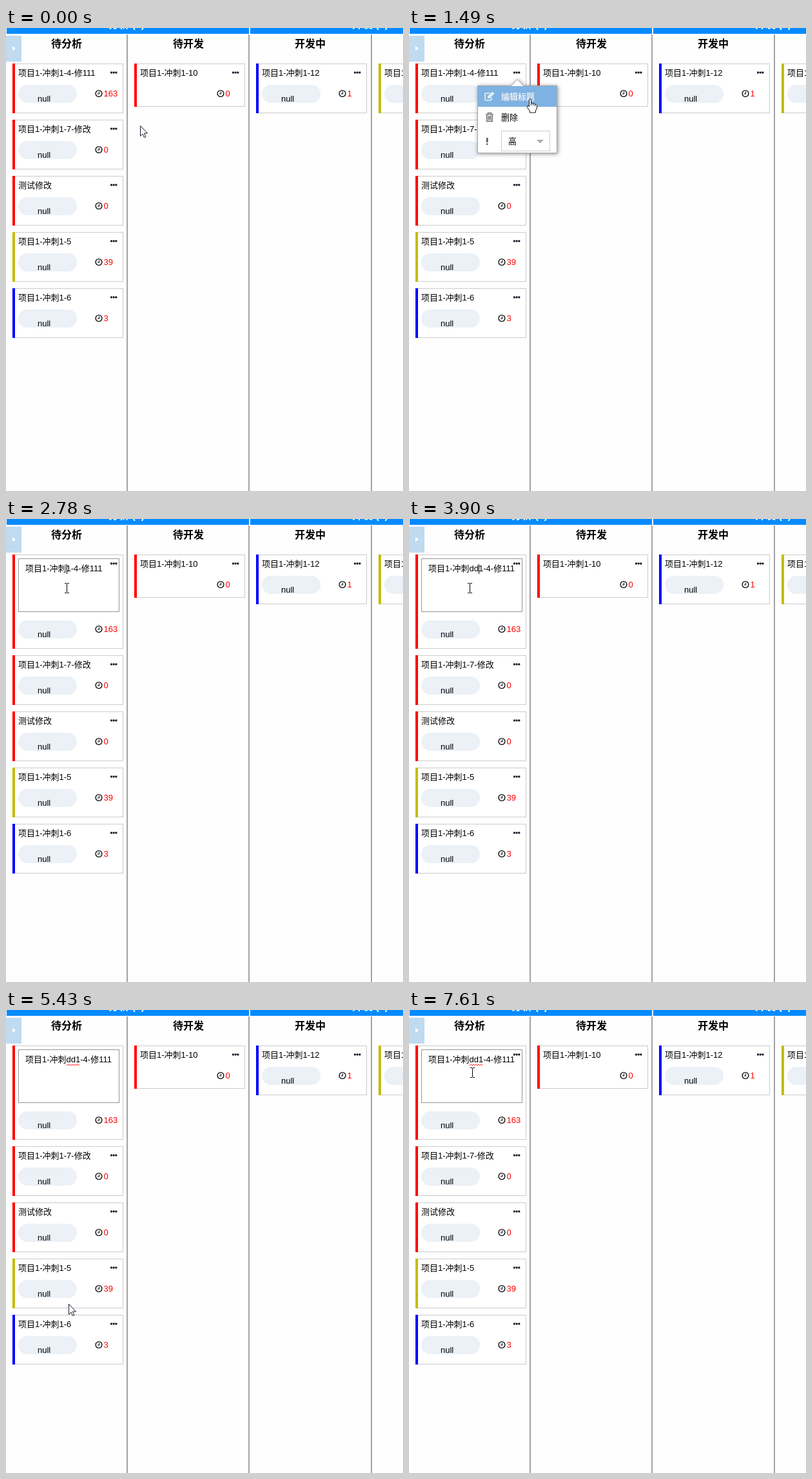
Write an HTML page that moves like this. It is 616 px wide and 717 px high and loops after 8000 ms.

```html
<!DOCTYPE html>
<html lang="zh-CN">
<head>
<meta charset="utf-8">
<title>Board</title>
<style>
html, body { margin: 0; width: 100%; height: 100%; overflow: hidden; background: #fefefe; }
svg { display: block; font: 13px "Liberation Sans", "Noto Sans CJK SC", "Noto Sans CJK", sans-serif; }
.head { font-size: 16px; font-weight: bold; text-anchor: middle; }
.popup { filter: drop-shadow(1px 1px 3px rgba(0, 0, 0, .45)); }
</style>
</head>
<body>
<svg id="stage" width="616" height="717" viewBox="0 0 616 717"></svg>
<script>
const LOOP = 8000;
const RED = '#f00', YELLOW = '#c4bc0c', BLUE = '#00f';

const rect = (x, y, w, h, fill, extra = '') =>
  `<rect x="${x}" y="${y}" width="${w}" height="${h}" fill="${fill}" ${extra}/>`;
const frame = (x, y, w, h, stroke, extra = '') =>
  rect(x + .5, y + .5, w - 1, h - 1, '#fff', `stroke="${stroke}" ${extra}`);
const text = (x, y, str, extra = '') => `<text x="${x}" y="${y}" ${extra}>${str}</text>`;
const line = (d, stroke, extra = '') => `<path d="${d}" fill="none" stroke="${stroke}" ${extra}/>`;
const group = (id, body, extra = '') => `<g id="${id}" ${extra}>${body}</g>`;

const dots = (x, y) =>
  [0, 3.7, 7.4].map(dx => rect(x + dx, y, 2.9, 3, '#0c1626', 'rx=".8"')).join('');

const clock = (x, y) =>
  `<circle cx="${x}" cy="${y}" r="4.9" fill="none" stroke="#111" stroke-width="1.4"/>` +
  line(`M${x + .5} ${y - 3}V${y + .5}H${x - 2.2}`, '#111', 'stroke-width="1.1"');

const details = (x, y, count, pill) =>
  (pill ? rect(x + 9, y + 33, 91, 28, '#ebf1f6', 'rx="14"') + text(x + 39, y + 59, 'null') : '') +
  clock(x + 134, y + 46.5) + text(x + 141.5, y + 51, count, `fill="${RED}"`);

const box = (x, y, h, color) => frame(x, y, 172, h, '#ccc') + rect(x, y, 4, h, color);

const card = (x, y, color, title, count, pill = true) =>
  box(x, y, pill ? 77 : 67, color) + text(x + 9, y + 19, title) +
  dots(x + 152, y + 12.5) + details(x, y, count, pill);

const board =
  rect(1, 0, 615, 9, '#058bff') + rect(377, 0, 2, 9, '#fff') +
  text(187, 0, '分析 (5)', 'class="head" fill="#fff"') +
  text(565, 0, '开发 (2)', 'class="head" fill="#fff"') +
  [187, 376, 566].map(x => rect(x, 10, 2, 707, '#a3a3a3')).join('') +
  ['待分析', '待开发', '开发中'].map((s, i) => text(94 + i * 189, 30, s, 'class="head"')).join('') +
  card(199, 55, RED, '项目1-冲刺1-10', 0, false) +
  card(388, 55, BLUE, '项目1-冲刺1-12', 1) +
  card(578, 55, YELLOW, '项目1-冲刺1-11', 2);

const lowerCards = [
  [RED, '项目1-冲刺1-7-修改', 0],
  [RED, '测试修改', 0],
  [YELLOW, '项目1-冲刺1-5', 39],
  [BLUE, '项目1-冲刺1-6', 3]
].map((c, i) => card(10, 142 + i * 87, ...c)).join('');

let wave = 'M94 86';
for (let x = 96, up = true; x <= 115; x += 2, up = !up) wave += `L${x} ${up ? 84 : 86}`;

const editor =
  box(10, 55, 146, RED) + details(10, 124, 163, true) +
  frame(19, 61, 157, 83, '#999', 'id="field"') +
  text(30, 81, '', 'id="value"') +
  line(wave, '#f22', 'id="squiggle"') +
  group('editorDots', dots(162, 67.5)) +
  rect(0, 70, 1, 15, '#000', 'id="caret"');

const pencil = line('M128 107.5V110.5Q128 112 126.500 112H119.500Q118 112 118 110.500V102.500' +
  'Q118 101 119.500 101H126', 'currentColor', 'stroke-width="1.7"') +
  '<path d="M122 106L129.500 98.500L132.500 101.500L125 109H122Z" fill="currentColor"/>';

const trash = line('M119 134H131M122.500 133.500V131.700H127.500V133.500M120.700 134V144.300H129.300V134' +
  'M123 136V142.500M125 136V142.500M127 136V142.500', '#555', 'stroke-width="1.2"');

const menu =
  group('', frame(106, 89, 124, 105, '#a6a6a6') +
    '<path d="M158 90L168 79.500L178 90" fill="#fff" stroke="#a6a6a6"/>', 'class="popup"') +
  rect(107, 90, 122, 32, '#7eb2e2', 'id="hilite"') +
  group('firstRow', pencil + text(143, 110.5, '编辑标题', 'fill="currentColor"')) +
  trash + text(143, 143, '删除') +
  rect(120, 170, 2.6, 7, '#555', 'rx=".8"') + rect(120, 178.500, 2.6, 2.6, '#555', 'rx=".8"') +
  frame(143, 159, 76, 32, '#ccc') + text(154, 180, '高') +
  '<path d="M198 173H209L203.500 178.500Z" fill="#aaa"/>';

const cursors =
  group('arrow', '<path d="M.5 .5V16.500L4 13L6.500 18.500L9 17.500L6.500 12H11.500Z" fill="#fff" stroke="#1a1a30"/>') +
  group('hand', '<path d="M-1.500 1.500Q0-.5 1.500 1.500V7.500Q3 6.500 4.500 8Q6.500 7.300 7.500 9Q9.500 8.500 10.500 10.500' +
    'V15L8.500 19V22H-.5V20L-4.800 13.500Q-5 11-3 11.500L-1.500 13Z" fill="#fff" stroke="#111"/>' +
    line('M1.500 7.500V11M4.500 8V11M7.500 9V12', '#111')) +
  group('beam', line('M-3-7.500H0M1-7.500H4M.5-7V7M-3 7.500H0M1 7.500H4', '#000'));

const stage = document.getElementById('stage');
stage.innerHTML = board +
  group('idle', card(10, 55, RED, '项目1-冲刺1-4-修111', 163)) +
  group('lower', lowerCards) + group('editing', editor) +
  rect(0, 12, 24, 40, '#c0daf0') + '<path d="M10 28L15 31.500L10 35Z" fill="#fff"/>' +
  group('menu', menu) + cursors;

const el = {};
stage.querySelectorAll('[id]').forEach(n => { if (n.id) el[n.id] = n; });

// [start ms, kind, x, y]
const pointer = [
  [0, 'arrow', 208, 151], [120, 'arrow', 206, 146], [255, 'arrow', 194, 116],
  [390, 'arrow', 177, 85], [525, 'hand', 168, 70], [660, 'hand', 166, 66],
  [1360, 'hand', 180, 94], [1490, 'hand', 188, 109], [1960, 'arrow', 188, 109],
  [2390, 'beam', 162, 108], [2520, 'beam', 118, 107], [2650, 'beam', 94, 107],
  [4020, 'beam', 94, 116], [4165, 'arrow', 92, 215], [4310, 'arrow', 87, 390],
  [4450, 'arrow', 81, 525], [4590, 'arrow', 78, 590], [4730, 'arrow', 78, 607],
  [4880, 'arrow', 78, 610], [5010, 'arrow', 78, 612], [5280, 'arrow', 82, 580],
  [5420, 'arrow', 97, 455], [5560, 'arrow', 118, 300], [5700, 'beam', 135, 175],
  [5840, 'beam', 143, 138], [5980, 'beam', 144, 134], [6370, 'beam', 158, 139],
  [6510, 'arrow', 207, 158], [6650, 'arrow', 250, 176], [6790, 'arrow', 263, 181],
  [7070, 'arrow', 224, 158], [7200, 'beam', 130, 110], [7330, 'beam', 98, 97]
];
// [start ms, x]; x = 0 hides the caret
const caret = [
  [0, 0], [2780, 94], [3340, 0], [3740, 101], [3880, 108], [4450, 0], [5010, 108],
  [5420, 0], [5980, 144], [6510, 0], [7070, 144], [7610, 0]
];
const typed = [[0, ''], [3740, 'd'], [3880, 'dd']];

const at = (steps, t) => steps.findLast(s => s[0] <= t);
const show = (name, on) => { el[name].style.display = on ? '' : 'none'; };

function draw(t) {
  const [, kind, x, y] = at(pointer, t);
  const caretX = at(caret, t)[1];
  const editing = t >= 1960;
  const lit = t >= 1360;

  show('idle', !editing);
  show('editing', editing);
  el.lower.setAttribute('transform', `translate(0 ${editing ? 69 : 0})`);

  show('menu', t >= 930 && !editing);
  show('hilite', lit);
  el.firstRow.setAttribute('color', lit ? '#e9eef2' : '#333');
  el.firstRow.setAttribute('font-weight', lit ? 'bold' : 'normal');

  el.field.setAttribute('stroke', t < 2780 ? '#ccc' : '#959595');
  el.value.textContent = `项目1-冲刺${at(typed, t)[1]}1-4-修111`;
  show('squiggle', t >= 4880);
  show('editorDots', x < 182 && y < 201);
  show('caret', caretX > 0);
  el.caret.setAttribute('x', caretX);

  for (const name of ['arrow', 'hand', 'beam']) show(name, name === kind);
  el[kind].setAttribute('transform', `translate(${x} ${y})`);
}

const start = performance.now();
function tick() {
  draw((performance.now() - start) % LOOP);
  requestAnimationFrame(tick);
}
tick();
</script>
</body>
</html>
```
